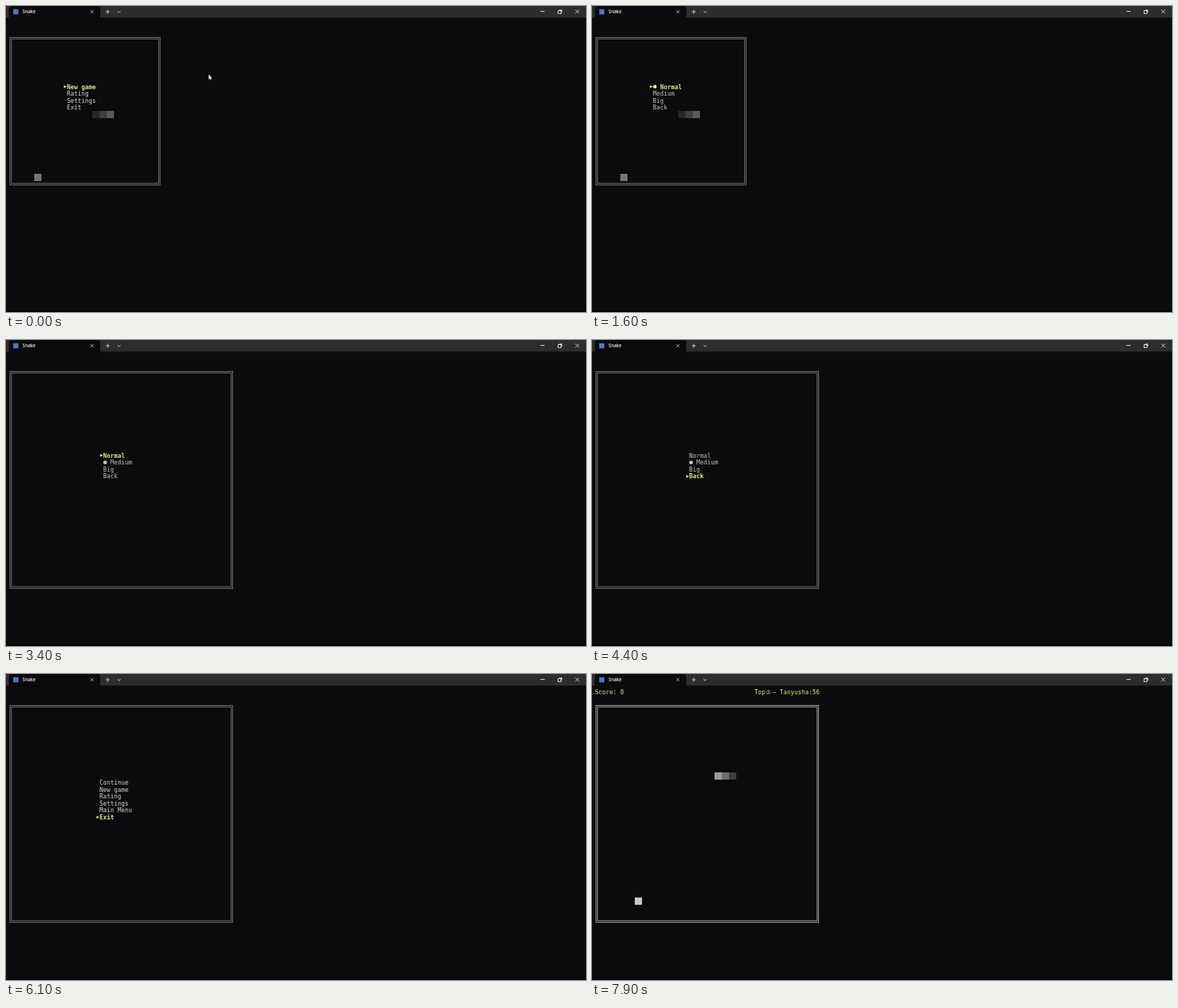
Animation of 800 by 423 pixels, one loop 8000 ms. Source, as an HTML page with a canvas:

```html
<!DOCTYPE html>
<html lang="en">
<head>
<meta charset="utf-8">
<title>Snake</title>
<style>
  html, body { margin: 0; width: 100%; height: 100%; overflow: hidden; background: #0b0a0c; }
  canvas { display: block; width: 800px; height: 423px; }
</style>
</head>
<body>
<canvas id="stage" width="800" height="423"></canvas>
<script>
const ctx = document.getElementById('stage').getContext('2d');
const LOOP = 8000, COL = 5, ROW = 9.6;
const BG = '#0b0a0c', YELLOW = '#e6e98c', WHITE = '#dededc', GREY = '#c6c6c4';
const MONO = '"DejaVu Sans Mono", "Noto Sans Mono", monospace';

const rowMid = r => 25.4 + r * ROW;

const menus = {
  main: ['New game', 'Rating', 'Settings', 'Exit'],
  settings: ['Grid size', 'Speed', 'Back'],
  size: ['Normal', 'Medium', 'Big', 'Back'],
  pause: ['Continue', 'New game', 'Rating', 'Settings', 'Main Menu', 'Exit']
};

// [start ms, board, menu, selected line, chosen size]
const scenes = [
  [0, 'small', 'main', 0],
  [300, 'small', 'main', 1],
  [600, 'small', 'main', 2],
  [1000, 'small', 'settings', 0],
  [1400, 'small', 'size', 0, 0],
  [2100, 'small', 'size', 1, 0],
  [2300],
  [2700, 'big', 'size', 0, 1],
  [3700, 'big', 'size', 1, 1],
  [4000, 'big', 'size', 2, 1],
  [4300, 'big', 'size', 3, 1],
  [4600, 'big', 'settings', 0],
  [4900, 'big', 'settings', 1],
  [5200, 'big', 'settings', 2],
  [5600, 'big', 'pause', 3],
  [5700, 'big', 'pause', 4],
  [6100, 'big', 'pause', 5],
  [6300, 'big', 'pause', 0],
  [6500, 'big', 'pause', 1],
  [6700],
  [7000, 'big', 'game']
];

const boards = {
  small: { right: 211.5, bottom: 23, textX: 84, menuRow: 9 },
  big: { right: 311.5, bottom: 33, textX: 134, menuRow: 14 }
};

function box(x, y, w, h, color) {
  ctx.fillStyle = color;
  ctx.fillRect(x, y, w, h);
}

function line(color, width, ...pts) {
  ctx.strokeStyle = color;
  ctx.lineWidth = width;
  ctx.beginPath();
  for (let i = 0; i < pts.length; i += 2) ctx.lineTo(pts[i], pts[i + 1]);
  ctx.stroke();
}

function shape(color, ...pts) {
  ctx.fillStyle = color;
  ctx.beginPath();
  for (let i = 0; i < pts.length; i += 2) ctx.lineTo(pts[i], pts[i + 1]);
  ctx.fill();
}

// Terminal text: one glyph per column
function print(text, x, row, color, bold) {
  ctx.font = (bold ? 'bold ' : '') + '8.2px ' + MONO;
  ctx.fillStyle = color;
  [...text].forEach((ch, i) => ctx.fillText(ch, x + i * COL, rowMid(row) + 2.8));
}

function cell(x, row, color) {
  box(x, Math.round(rowMid(row) - ROW / 2), 10, 10, color);
}

function drawWindow() {
  box(0, 0, 800, 423, BG);
  box(0, 421, 800, 2, '#050405');
  box(0, 0, 800, 16, '#2d2d2d');
  ctx.fillStyle = BG;
  ctx.beginPath();
  ctx.roundRect(4, 0, 126, 16, [4, 4, 0, 0]);
  ctx.fill();
  box(10, 4.5, 7, 7, '#4a78cc');
  ctx.font = '600 6.2px "Open Sans", "Noto Sans", sans-serif';
  ctx.fillStyle = '#f4f4f4';
  ctx.fillText('Snake', 22.8, 10.4);

  const c = '#dcdcdc';
  line(c, 0.8, 116.3, 5.8, 120.7, 10.2);
  line(c, 0.8, 120.7, 5.8, 116.3, 10.2);
  line(c, 0.9, 137.5, 8, 143.3, 8);
  line(c, 0.9, 140.4, 5.1, 140.4, 10.9);
  line('#3c3c3c', 0.6, 148.5, 4, 148.5, 12);
  line(c, 0.9, 153.8, 7, 156, 9.2, 158.2, 7);
  line(c, 1, 737, 7.5, 743, 7.5);
  ctx.strokeRect(761.5, 6.5, 4, 4);
  line(c, 0.9, 763, 5.4, 766.7, 5.4, 766.7, 9);
  line(c, 0.9, 785.3, 5, 790.7, 10.4);
  line(c, 0.9, 790.7, 5, 785.3, 10.4);
}

function drawFrame(b, color) {
  const top = rowMid(2) - 0.1, bottom = rowMid(b.bottom), left = 6.6;
  ctx.strokeStyle = color;
  ctx.lineWidth = 0.8;
  for (const d of [1.1, -1.1]) {
    ctx.strokeRect(left - d, top - d, b.right - left + 2 * d, bottom - top + 2 * d);
  }
}

function drawMenu(b, name, selected, chosen) {
  const items = menus[name];
  const x = b.textX - (name === 'settings' || name === 'pause' ? COL : 0);
  const first = b.menuRow - (name === 'pause' ? 1 : 0);
  const plain = name === 'size' ? GREY : WHITE;
  items.forEach((text, i) => {
    const on = i === selected, color = on ? YELLOW : plain, y = rowMid(first + i);
    if (on) shape(color, x - 4.2, y - 2.2, x - 0.2, y - 0.2, x - 4.2, y + 1.8);
    if (i === chosen) {
      ctx.fillStyle = color;
      ctx.beginPath();
      ctx.arc(x + 2.7, y - 0.2, 2.5, 0, 2 * Math.PI);
      ctx.fill();
    }
    print(text, x + (i === chosen ? 2 * COL : 0), first + i, color, on);
  });
}

function drawGame(t) {
  print('Score: 0', 4, 0, YELLOW);
  print('Top', 224, 0, YELLOW);
  ctx.font = '9px "DejaVu Sans", sans-serif';
  ctx.fillText('♔', 239.3, rowMid(0) + 2.8);
  print('– Tanyusha:56', 249, 0, YELLOW);
  cell(59, 30, '#cacaca');

  // Right, then six rows up, then two cells left
  const at = i => i < 3 ? [169 + 10 * i, 18]
    : i < 9 ? [189, 20 - i]
    : [189 - 10 * (i - 8), 12];
  const steps = Math.max(0, Math.floor((t - 7300) / 100));
  const head = 2 + Math.min(8, Math.round(steps * 8 / 6));
  ['#9c9c9c', '#6c6c6c', '#3c3c3c'].forEach((color, i) => cell(...at(head - i), color));
}

function drawPointer() {
  shape('#f4f4f4', 279.6, 94.4, 279.6, 101.6, 281.2, 100.2, 282.3, 102.5,
    283.3, 102, 282.2, 99.8, 284.2, 99.6);
}

function draw(t) {
  drawWindow();
  const [, size, mode, selected, chosen] = scenes.filter(s => s[0] <= t).pop();
  if (size) {
    const b = boards[size];
    drawFrame(b, mode === 'game' ? '#d2d2d2' : '#929292');
    if (size === 'small') {
      ['#262626', '#404040', '#5a5a5a'].forEach((c, i) => cell(119 + 10 * i, 13, c));
      cell(39, 22, '#747474');
    }
    if (mode === 'game') drawGame(t);
    else drawMenu(b, mode, selected, chosen);
  }
  if (t < 100) drawPointer();
}

const start = performance.now();
function tick() {
  draw((performance.now() - start) % LOOP);
  requestAnimationFrame(tick);
}
tick();
</script>
</body>
</html>
```
